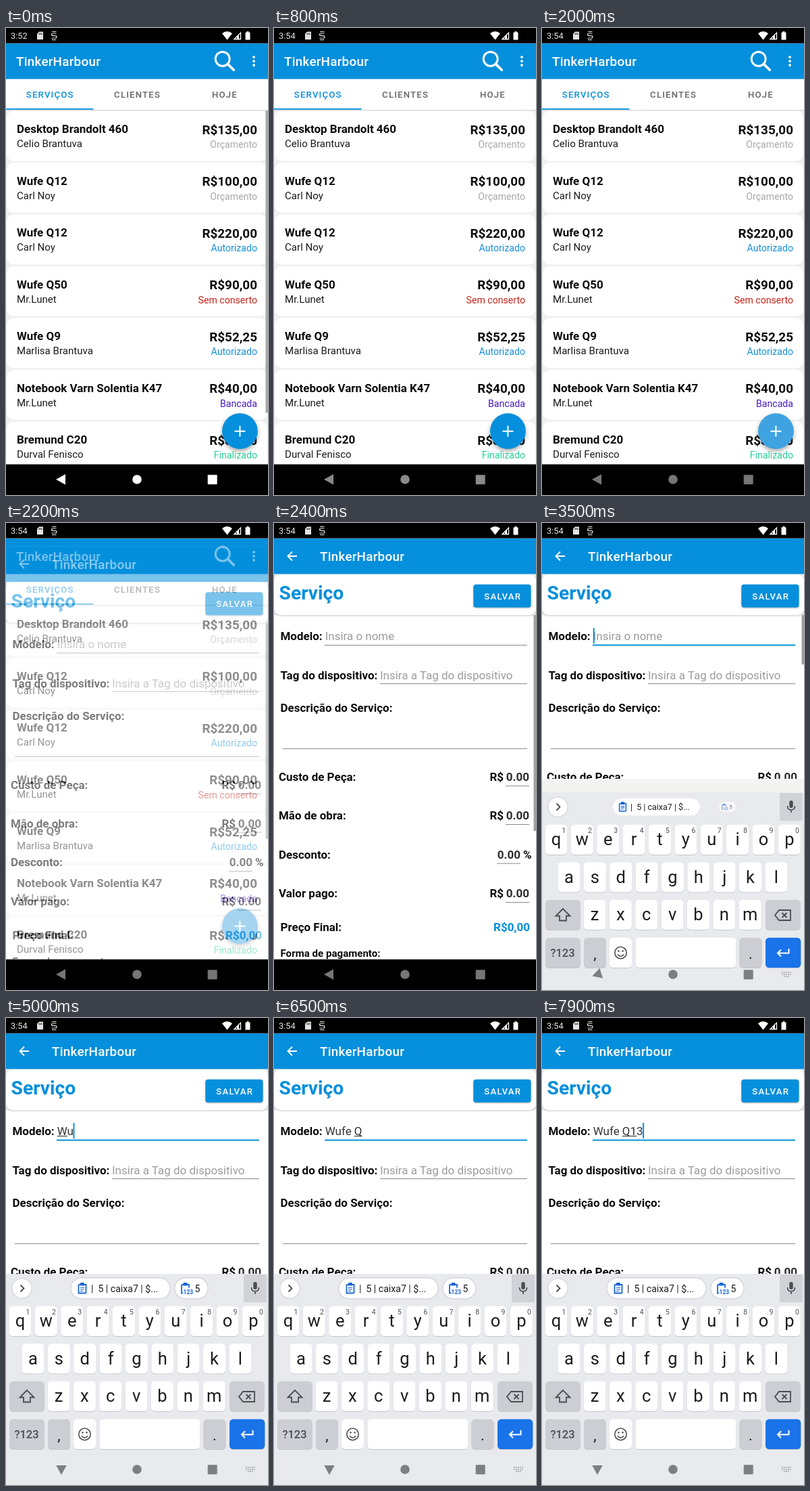
Recreate the animation shown at these times as an HTML page. Size 388 px wide and 690 px high, loop 8 s.

```html
<!DOCTYPE html>
<html lang="pt-BR">
<head>
<meta charset="utf-8">
<title>Serviços</title>
<style>
html, body { margin: 0; width: 100%; height: 100%; overflow: hidden; background: #fff; }
svg { display: block; width: 388px; height: 690px; font-family: Roboto, "Noto Sans", sans-serif; }
text { white-space: pre; }
</style>
</head>
<body>
<svg id="stage" viewBox="0 0 388 690"></svg>
<script>
const LOOP = 8000, STEP = 100;
const BLUE = '#058fdc', LINE = '#8a8a8a', HINT = '#9c9c9c', INK = '#0c0c0c';
const APP = 'TinkerHarbour';
// Edges of the bars and the text sizes of the app
const BAR_TOP = 22.6, BAR_END = 75.4, TABS_END = 120.7, NAV_TOP = 644.7;
const SP = 0.943;
const stage = document.getElementById('stage');

function add(parent, tag, attrs = {}, content) {
  const el = document.createElementNS('http://www.w3.org/2000/svg', tag);
  set(el, attrs);
  if (content !== undefined) el.textContent = content;
  parent.appendChild(el);
  return el;
}
function set(el, attrs) {
  for (const k in attrs) el.setAttribute(k, attrs[k]);
}
const group = (p, attrs) => add(p, 'g', attrs);
const rect = (p, x, y, width, height, fill, rx = 0, more = {}) =>
  add(p, 'rect', { x, y, width, height, fill, rx, ...more });
const circle = (p, cx, cy, r, fill, more = {}) => add(p, 'circle', { cx, cy, r, fill, ...more });
const path = (p, d, fill, more = {}) => add(p, 'path', { d, fill, ...more });
const stroke = (p, d, color, width = 2, more = {}) =>
  path(p, d, 'none', { stroke: color, 'stroke-width': width, ...more });
const text = (p, x, y, size, fill, str, more = {}) =>
  add(p, 'text', { x, y, 'font-size': size, fill, ...more }, str);
const BOLD = { 'font-weight': 700 };
const MEDIUM = { 'font-weight': 500 };
const END = { 'text-anchor': 'end' };
const MID = { 'text-anchor': 'middle' };
const TITLE = { ...MEDIUM, 'letter-spacing': 0.24 };
const CAPS = { ...MEDIUM, ...MID, 'letter-spacing': 1.18 };
const show = (el, on) => set(el, { visibility: on ? 'visible' : 'hidden' });

// Fraction of the way from a to b, clamped
const ramp = (t, a, b) => Math.min(1, Math.max(0, (t - a) / (b - a)));
// Last entry of [[time, value...], ...] already reached
const at = (list, t) => list.filter(e => e[0] <= t).pop();

const defs = add(stage, 'defs');
function clip(id, y, y2) {
  rect(add(defs, 'clipPath', { id }), 0, y, 388, y2 - y, '#000');
  return `url(#${id})`;
}
const contentClip = clip('content', BAR_TOP, NAV_TOP);
const listClip = clip('list', TABS_END, NAV_TOP);

// ---------- list screen ----------
const list = group(stage, { 'clip-path': contentClip });
rect(list, 0, BAR_TOP, 388, 623, '#f0f0f0');

const cards = group(list, { 'clip-path': listClip });
const rows = [
  ['Desktop Brandolt 460', 'Celio Brantuva', 'R$135,00', 'Orçamento'],
  ['Wufe Q12', 'Carl Noy', 'R$100,00', 'Orçamento'],
  ['Wufe Q12', 'Carl Noy', 'R$220,00', 'Autorizado'],
  ['Wufe Q50', 'Mr.Lunet', 'R$90,00', 'Sem conserto'],
  ['Wufe Q9', 'Marlisa Brantuva', 'R$52,25', 'Autorizado'],
  ['Notebook Varn Solentia K47', 'Mr.Lunet', 'R$40,00', 'Bancada'],
  ['Bremund C20', 'Durval Fenisco', 'R$80,00', 'Finalizado']
];
const statusColor = {
  'Orçamento': '#a9a9a9', 'Autorizado': '#1590d6', 'Sem conserto': '#c9261b',
  'Bancada': '#4a1cc0', 'Finalizado': '#28cf9a'
};
rows.forEach(([device, client, price, status], i) => {
  const g = group(cards, { transform: `translate(0 ${i * 76.5})` });
  rect(g, 1, 122.5, 386, 74, '#fff', 11);
  text(g, 16, 155, 18 * SP, INK, device, BOLD);
  text(g, 16, 176, 16 * SP, '#1c1c1c', client);
  text(g, 372, 156.7, 20 * SP, INK, price, { ...BOLD, ...END });
  text(g, 372, 177, 15 * SP, statusColor[status], status, END);
});
const listBar = rect(cards, 384.5, TABS_END, 3.5, 448, '#a8a8a8');

rect(list, 0, TABS_END, 388, 1.5, '#dcdcdc');
rect(list, 0, BAR_END, 388, TABS_END - BAR_END, '#fff');
rect(list, 0, BAR_TOP, 388, BAR_END - BAR_TOP, BLUE);
text(list, 15, 56, 20 * SP, '#fff', APP, TITLE);
circle(list, 320.7, 45.7, 10.5, 'none', { stroke: '#fff', 'stroke-width': 3 });
stroke(list, 'M328.200 53.200L337.300 62', '#fff', 3.8, { 'stroke-linecap': 'round' });
[43, 49, 55].forEach(y => circle(list, 367, y, 1.9, '#fff'));
[['SERVIÇOS', 65.3, BLUE], ['CLIENTES', 194.6, '#666'], ['HOJE', 324, '#666']].forEach(([label, x, color]) =>
  text(list, x, 103.3, 14 * SP, color, label, CAPS));
rect(list, 0, TABS_END - 1.9, 129.5, 1.9, BLUE);

const fab = circle(list, 346.4, 595.7, 26.4, BLUE, { style: 'filter:drop-shadow(0 3px 3px rgba(0,0,0,.35))' });
stroke(list, 'M346.400 587.700V603.700M338.400 595.700H354.400', '#fff', 2);

// ---------- form screen ----------
const formWrap = group(stage, { 'clip-path': contentClip });
const form = group(formWrap);
rect(form, 0, BAR_TOP, 388, 623, '#fff');
rect(form, 0, BAR_END, 388, 60.6, '#ececec');
rect(form, 0, 76, 388, 60, '#fff', 9, { style: 'filter:drop-shadow(0 1.5px 1.5px rgba(0,0,0,.22))' });
rect(form, 0, BAR_TOP, 388, BAR_END - BAR_TOP, BLUE);
stroke(form, 'M34 49H21M27 42.5L20.5 49L27 55.5', '#fff', 1.9);
text(form, 68, 56, 20 * SP, '#fff', APP, TITLE);
text(form, 7.5, 113, 30 * SP, BLUE, 'Serviço', BOLD);
rect(form, 295.3, 90.7, 85.2, 34, BLUE, 3.8, { style: 'filter:drop-shadow(0 1px 1px rgba(0,0,0,.3))' });
text(form, 338.7, 112.7, 14 * SP, '#fff', 'SALVAR', CAPS);

const underline = (x, y, x2) => rect(form, x, y, x2 - x, 1, LINE);
const label = (x, y, str, size = 18 * SP) => text(form, x, y, size, INK, str, BOLD);
label(9.5, 173, 'Modelo:');
label(9.5, 231, 'Tag do dispositivo:');
label(9.5, 279, 'Descrição do Serviço:');
label(9.5, 603, 'Preço Final:');
label(9.5, 641, 'Forma de pagamento:', 16 * SP);
const SIZE = 18 * SP, FIELD_X = 75.7;
const modelHint = text(form, FIELD_X, 173, SIZE, HINT, 'Insira o nome');
text(form, 157, 231, SIZE, HINT, 'Insira a Tag do dispositivo');
const modelLine = underline(75, 180, 375);
underline(157, 237, 375);
underline(13, 333, 375);
[['Custo de Peça:', 381], ['Mão de obra:', 438], ['Desconto:', 495.5], ['Valor pago:', 553]].forEach(([name, y], i) => {
  const percent = i === 2, right = percent ? 365 : 378;
  label(7, y, name);
  label(percent ? 369 : 319.5, y, percent ? '%' : 'R$');
  text(form, right, y, SIZE, '#2c2c2c', '0.00', { ...BOLD, ...END });
  underline(right - 35, y + 7, right);
});
text(form, 379, 603, SIZE, BLUE, 'R$0,00', { ...BOLD, ...END });
const formBar = rect(form, 384.5, 136, 3.5, 319, '#a0a0a0');

const typed = text(form, FIELD_X, 173, SIZE, '#333', '');
const composing = rect(form, FIELD_X, 174, 0, 1, '#222');
const caret = rect(form, FIELD_X, 155, 2, 23, BLUE);

// ---------- system bars ----------
rect(stage, 0, 0, 388, BAR_TOP, '#000');
const clock = text(stage, 7, 16, 12.8, '#e4e4e4', '');
path(stage, 'M49 5.500H55V17H46V8.500Z', '#e4e4e4');
stroke(stage, 'M49 7.500V10M51 7.500V10M53 7.500V10', '#000', 0.9);
stroke(stage, 'M74.500 8H70Q67.500 8 67.500 9.700T70 11.400H72.500Q75 11.400 75 13.200T72.500 15H67.500M68 5.500H74.500M68 17.500H74.500', '#e4e4e4', 1.2);
path(stage, 'M320 8Q327.500 2 335 8L327.500 17.500Z', '#fff');
stroke(stage, 'M338 16.500L347.500 7V16.500Z', '#fff', 1.3);
path(stage, 'M342 16.500V13L345 10V16.500Z', '#fff');
path(stage, 'M354.500 6.500H356.500V5H359.500V6.500H361.500V17.500H354.500Z', '#fff');
rect(stage, 0, NAV_TOP, 388, 46, '#000');

// ---------- keyboard ----------
const ime = group(stage);
rect(ime, 0, 378, 388, 312, '#f3f3f2');
const kb = group(ime);
const GRAY = '#ccced3', KEY_INK = '#1d1d1f', DIM = '#4b4d50';
rect(kb, 0, 378, 388, 400, '#e8eaee');
circle(kb, 23.5, 399.5, 14, '#fff', { style: 'filter:drop-shadow(0 .5px .8px rgba(0,0,0,.25))' });
stroke(kb, 'M21.500 394.500L26.500 399.500L21.500 404.500', DIM, 1.8);
rect(kb, 352, 379, 34, 41, '#d0d2d7', 2);
rect(kb, 366.3, 390, 5.4, 11, DIM, 2.7);
stroke(kb, 'M363.500 398Q363.500 404 369 404T374.500 398M369 404V408', DIM, 1.6);

function chip(width, iconX, textX, str, numbered) {
  const g = group(kb);
  const left = iconX - 5.5, right = iconX + 5.5;
  rect(g, -width / 2, -15, width, 30, '#fff', 15, { style: 'filter:drop-shadow(0 .5px .8px rgba(0,0,0,.3))' });
  stroke(g, `M${left} -5.500H${right}V${numbered ? -1 : 7}M${left} -5.500V7H${numbered ? left + 2 : right}`, '#1a66d6', 1.8);
  rect(g, iconX - 3, -8.5, 6, 4.5, '#1a66d6', 1);
  if (numbered) text(g, iconX - 3, 8, 8.5, '#1a66d6', '123', BOLD);
  else stroke(g, `M${left + 2.5} -1H${right - 2.5}M${left + 2.5} 1.500H${right - 2.5}M${left + 2.5} 4H${iconX + 1}`, '#1a66d6', 1.2);
  text(g, textX, 5, 14.1, KEY_INK, str);
  return g;
}
const chips = [
  { el: chip(146, -56.5, -43.5, '|  5 | caixa7 | $...', false), x: 169.5 },
  { el: chip(48, -9, 5, '5', true), x: 274.5 }
];

function key(x, y, w, fill = '#fff') {
  rect(kb, x, y + 0.8, w, 44, '#b8bac0', 5.5);
  rect(kb, x, y - 0.3, w, 44.3, fill, 5.5);
}
const PITCH = 38.37;
[['qwertyuiop', 21, 426], ['asdfghjkl', 40, 481.5], ['zxcvbnm', 78, 537]].forEach(([letters, x0, y], row) => {
  [...letters].forEach((ch, i) => {
    const x = x0 + i * PITCH;
    key(x - 16.5, y, 33);
    text(kb, x, y + 30, 25.5, KEY_INK, ch, MID);
    if (!row) text(kb, x + 11.5, y + 11.5, 10.5, DIM, (i + 1) % 10, MID);
  });
});
key(5, 537, 52, GRAY);
stroke(kb, 'M31 550L20.500 560.500H26V567.500H36V560.500H41.500Z', DIM, 1.8);
key(331, 537, 52, GRAY);
stroke(kb, 'M345 559.500L351 552H368V567H351ZM355.500 556L362.500 563M362.500 556L355.500 563', DIM, 1.8);
key(5, 593, 52, GRAY);
text(kb, 30.5, 621, 16.5, DIM, '?123', { ...MID, ...MEDIUM });
key(62, 593, 33, GRAY);
text(kb, 78.5, 624, 22, KEY_INK, ',', MID);
key(100, 593, 33);
circle(kb, 116.5, 615, 8.7, 'none', { stroke: DIM, 'stroke-width': 1.6 });
circle(kb, 113.5, 612.5, 1.3, DIM);
circle(kb, 119.5, 612.5, 1.3, DIM);
stroke(kb, 'M112 617.500Q116.500 623 121 617.500', DIM, 1.6);
key(138.5, 593, 149);
key(292.5, 593, 33, GRAY);
text(kb, 309, 624, 22, KEY_INK, '.', MID);
key(331, 593, 52.3, '#1a73e8');
stroke(kb, 'M365.500 609V615.500H349.500M354 610.500L349 615.500L354 620.500', '#fff', 2);

// ---------- navigation buttons ----------
const nav = group(stage);
const back = path(nav, 'M-8 0L6 -7.700V7.700Z', 'inherit');
circle(nav, 194, 667, 6.8, 'inherit');
rect(nav, 298.7, 660.2, 14, 14, 'inherit', 1);
const switcher = group(stage);
stroke(switcher, 'M355 664H369M355 667H369M358 670H366', '#8f9195', 1.5, { 'stroke-dasharray': '1.6 1.4' });

// ---------- timeline ----------
// time, text, composing span start and end
const typing = [
  [0, '', 0, 0],
  [4700, 'W', 0, 0], [4800, 'W', 0, 1],
  [5000, 'Wu', 0, 1], [5100, 'Wu', 0, 2],
  [5200, 'Wuf', 0, 2], [5300, 'Wufe', 0, 3], [5400, 'Wufe', 0, 4],
  [5600, 'Wufe ', 0, 0],
  [5800, 'Wufe Q', 0, 0], [5900, 'Wufe Q', 5, 6],
  [7400, 'Wufe Q1', 5, 6], [7600, 'Wufe Q1', 5, 7],
  [7800, 'Wufe Q13', 5, 7]
];
const caretState = [[0, false], [3100, true], [3600, false], [4100, true], [6500, false], [7000, true]];
// time, keyboard drop, chip scales, back button angle
const slide = [
  [3200, 120, 0, 0, 0],
  [3300, 20, 0.885, 0.55, -18],
  [3600, 8, 0.95, 0.8, -55],
  [3700, 0, 0.99, 0.95, -80],
  [3800, 0, 1, 1, -90]
];
const ruler = document.createElement('canvas').getContext('2d');
function width(str) {
  ruler.font = `${SIZE}px Roboto, "Noto Sans", sans-serif`;
  return ruler.measureText(str).width;
}

function drawField(t) {
  const [, str, from, to] = at(typing, t);
  const focused = t >= 3100;
  const start = width(str.slice(0, from));
  typed.textContent = str;
  show(modelHint, !str);
  set(composing, { x: FIELD_X + start, width: width(str.slice(0, to)) - start });
  set(modelLine, { fill: focused ? BLUE : LINE, height: focused ? 2 : 1, y: focused ? 179.5 : 180 });
  set(caret, { x: FIELD_X + width(str) - (str ? 0.5 : 0) });
  show(caret, at(caretState, t)[1]);
}

function drawKeyboard(t) {
  const pose = at(slide, t);
  show(ime, !!pose);
  show(switcher, !!pose);
  const [, drop, s1, s2, angle] = pose || [0, 0, 0, 0, 0];
  set(kb, { transform: `translate(0 ${drop})` });
  chips.forEach(({ el, x }, i) => {
    const s = i ? s2 : s1;
    set(el, { transform: `translate(${x} 399.5) scale(${s})`, opacity: s < 0.6 ? 0.65 : 1 });
  });
  set(back, { transform: `translate(82 667) rotate(${angle})` });
  const shade = Math.round(255 - 137 * ramp(t, 200, 900));
  set(nav, { fill: pose ? '#7c7e81' : `rgb(${shade},${shade},${shade})` });
}

function draw(t) {
  clock.textContent = t < 100 ? '3:52' : '3:54';
  set(listBar, { opacity: 1 - ramp(t, 200, 600) });
  set(fab, { fill: t >= 2000 ? '#3fa3e1' : BLUE });

  show(formWrap, t >= 2200);
  const enter = ramp(t, 2100, 2400);
  set(form, { transform: `translate(0 ${26 * (1 - enter) ** 2})`, opacity: Math.min(1, enter * 1.6) });
  const resized = t >= 3200;
  set(formBar, {
    height: resized ? 73 : 319,
    opacity: 1 - (resized ? ramp(t, 3500, 3900) : ramp(t, 2400, 2700))
  });
  drawField(t);
  drawKeyboard(t);
}

const began = performance.now();
function frame() {
  const t = (performance.now() - began) % LOOP;
  draw(Math.floor(t / STEP) * STEP);
  requestAnimationFrame(frame);
}
frame();
</script>
</body>
</html>
```
